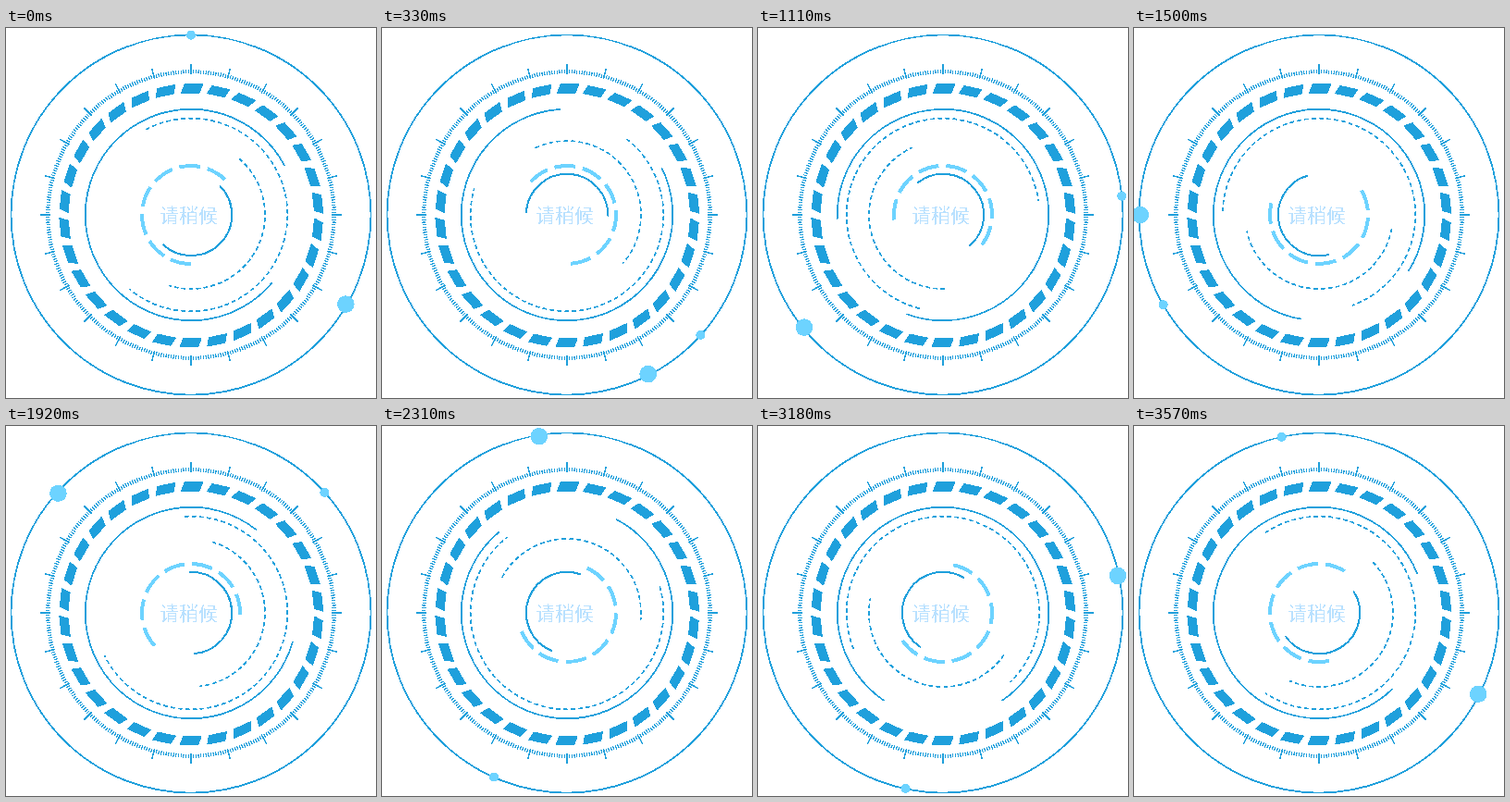
An HTML page with a canvas that plays this animation: 400x400 px, repeating every 3600 ms.

```html
<!DOCTYPE html>
<html lang="zh">
<head>
<meta charset="utf-8">
<style>
  html, body { margin: 0; width: 100%; height: 100%; overflow: hidden; background: #fff; }
  canvas { display: block; filter: url(#crisp); }
  svg { position: absolute; }
</style>
</head>
<body>
<svg width="0" height="0">
  <!-- Hard pixel edges: alpha is either off or on. -->
  <filter id="crisp" x="0" y="0" width="1" height="1" color-interpolation-filters="sRGB">
    <feComponentTransfer><feFuncA type="discrete" tableValues="0 1"/></feComponentTransfer>
  </filter>
</svg>
<canvas id="stage" width="400" height="400"></canvas>
<script>
const ctx = document.getElementById('stage').getContext('2d');
const BLUE = '#1fa0dc', LIGHT = '#6dd3ff', PALE = '#b9e1ff';
const STEP = 30, STEPS = 120;
const rad = deg => deg * Math.PI / 180;

// Angles in degrees, clockwise from east.
function arc(radius, from, to, { color = BLUE, width = 1.7, dash = [] } = {}) {
  ctx.beginPath();
  ctx.arc(0, 0, radius, rad(from), rad(to));
  ctx.strokeStyle = color;
  ctx.lineWidth = width;
  ctx.setLineDash(dash);
  ctx.stroke();
}

function dot(orbit, angle, size) {
  ctx.beginPath();
  ctx.arc(orbit * Math.cos(rad(angle)), orbit * Math.sin(rad(angle)), size, 0, 7);
  ctx.fillStyle = LIGHT;
  ctx.fill();
}

// Calls paint once for each of count equal turns, with "up" pointing outwards.
function around(count, paint, x = 0, y = 0) {
  for (let i = 0; i < count; i++) {
    ctx.save();
    ctx.translate(x, y);
    ctx.rotate(rad(i * 360 / count));
    paint();
    ctx.restore();
  }
}

function block() {
  ctx.beginPath();
  ctx.moveTo(-7.5, -142.4);
  ctx.lineTo(13, -142.4);
  ctx.lineTo(9, -132.4);
  ctx.lineTo(-11.5, -132.4);
  ctx.fill();
}

function dial() {
  ctx.fillStyle = BLUE;
  around(360, () => ctx.fillRect(-0.6, -157, 1.2, 4.5));
  around(24, () => ctx.fillRect(-0.75, -163.5, 1.5, 11.5));
  around(30, block, 0.3, 0.8);
}

function label() {
  ctx.font = '21px "Noto Sans CJK SC", "Noto Sans CJK", sans-serif';
  ctx.textAlign = 'center';
  ctx.fillStyle = PALE;
  ctx.fillText('请稍候', -2.5, 8);
}

function draw(step) {
  const slow = step * 6, fast = step * 12;
  ctx.setTransform(1, 0, 0, 1, 0, 0);
  ctx.clearRect(0, 0, 400, 400);
  ctx.translate(200, 202);

  arc(194.5, 0, 360);
  dial();
  arc(114.3, 39.7 - slow, 332.3 - slow);
  arc(104.3, 242 + slow, 490 + slow, { dash: [5, 3] });
  arc(80, -49.5 - slow, 107.5 - slow, { dash: [5, 3] });
  arc(53, 90 + fast, 313.7 + fast, { color: LIGHT, width: 4, dash: [22.7, 8] });
  arc(44.2, -45 - fast, 134 - fast, { width: 2 });
  dot(193.2, 30 + step * 3, 9.3);
  dot(194.3, 270 + fast, 5);
  label();
}

function frame() {
  draw(Math.floor(performance.now() / STEP) % STEPS);
  requestAnimationFrame(frame);
}
frame();
</script>
</body>
</html>
```
